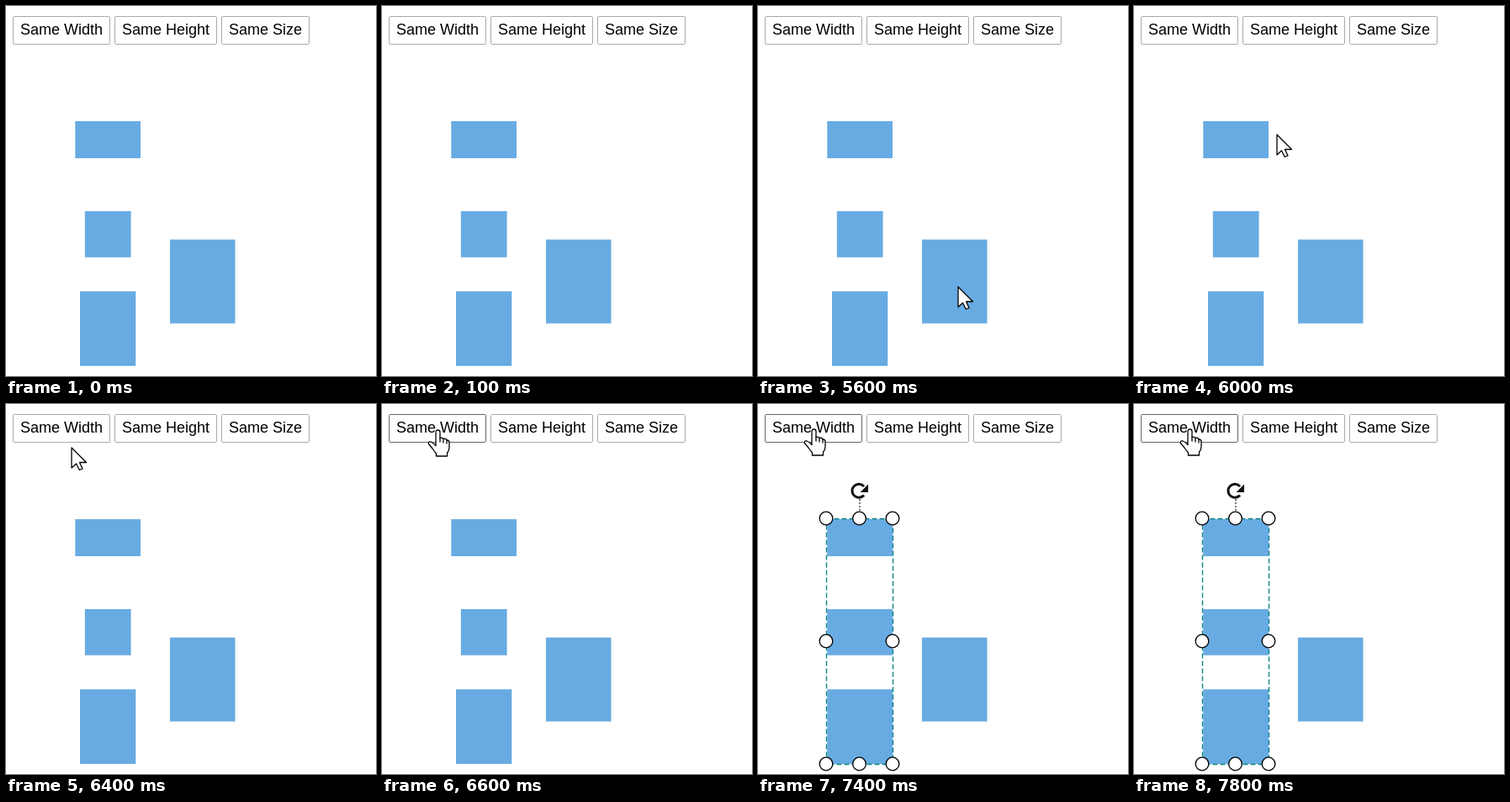
Recreate the animation shown at these times as an HTML page. Size 440 px wide and 440 px high, loop 8 s.

```html
<!DOCTYPE html>
<html lang="en">
<head>
<meta charset="utf-8">
<title>Same size commands</title>
<style>
  html, body { margin: 0; width: 100%; height: 100%; overflow: hidden; background: #fff; }
  svg { display: block; width: 100%; height: 100%; }
  text { font: 18px "Liberation Sans", Arial, sans-serif; }
  .button { fill: #fff; stroke: #aaa; }
  .button.hover { stroke: #666; }
  .shape { fill: #68abe2; }
  .handle, .pointer { fill: #fff; stroke: #000; stroke-width: 1.3; }
  .pointer { stroke-linejoin: round; stroke-linecap: round; }
</style>
</head>
<body>
<svg id="stage" viewBox="0 0 440 440">
  <g id="buttons"></g>
  <g id="shapes"></g>
  <g id="selection">
    <rect x="81.5" y="136.5" width="79" height="292" fill="none" stroke="#0b8585" stroke-width="1.4" stroke-dasharray="6 3"/>
    <path d="M121 113V128" stroke="#333" stroke-width="1.3" stroke-dasharray="2 2"/>
    <path d="M126 108.5A8 8 0 1 1 126 98" fill="none" stroke="#111" stroke-width="3"/>
    <path d="M131 95.5V105H121.5Z" fill="#111"/>
    <g id="handles"></g>
  </g>
  <path id="arrow" class="pointer" d="M0 0V24L5.5 19 9.3 26.5 13 25 9.5 17.5H17.5Z"/>
  <g id="hand" class="pointer">
    <path d="M-2 15V2.5Q-2 0 .5 0T3 2.5V9.5Q6 8.5 7 10.5 10 9.5 11 12 14 12 14 15V21Q14 24 11.5 27.5V31H-1.5V28Q-4 25 -6 22L-10.5 16.5Q-11.5 13.5 -8 14 -5 15 -2 18.5Z"/>
    <path d="M3 9.5V14M7 10.5V15M11 12V16" fill="none"/>
  </g>
</svg>
<script>
const LOOP = 8000, STEP = 100;
const HOVER_AT = 6500, RESIZE_AT = 7400;
const byId = id => document.getElementById(id);

function add(parent, tag, attributes, content = "") {
  const node = document.createElementNS("http://www.w3.org/2000/svg", tag);
  for (const name in attributes) node.setAttribute(name, attributes[name]);
  node.textContent = content;
  return byId(parent).appendChild(node);
}

const buttons = [["Same Width", 8, 116], ["Same Height", 129, 122], ["Same Size", 256, 105]]
  .map(([label, x, width]) => {
    const box = add("buttons", "rect", { class: "button", x: x + .5, y: 12.5, width: width - 1, height: 33, rx: 1 });
    add("buttons", "text", { x: x + 9, y: 34 }, label);
    return box;
  });

const shapes = [
  [82.3, 137, 77.7, 44], [93.8, 244, 54.8, 54.8], [88, 339.3, 66.3, 88.7], [195, 277.7, 77.5, 99.8]
].map(([x, y, width, height]) => ({ x, width, node: add("shapes", "rect", { class: "shape", x, y, width, height }) }));

for (const x of [81, 120.5, 160])
  for (const y of [136, 282, 428])
    if (x !== 120.5 || y !== 282) add("handles", "circle", { class: "handle", cx: x, cy: y, r: 7.8 });

// Pointer path: time, x, y
const path = [
  [5600, 238, 334], [6000, 170, 153], [6300, 107, 97], [6400, 78, 52],
  [6500, 70, 38], [6600, 66, 31], [6700, 66, 30], [LOOP, 66, 30]
];

function pointerAt(time) {
  const next = Math.max(1, path.findIndex(point => point[0] > time));
  const [t0, x0, y0] = path[next - 1], [t1, x1, y1] = path[next];
  const k = (time - t0) / (t1 - t0);
  return [x0 + (x1 - x0) * k, y0 + (y1 - y0) * k];
}

const show = (id, visible) => byId(id).setAttribute("display", visible ? "inline" : "none");

function draw(now) {
  const time = Math.floor(now % LOOP / STEP) * STEP;
  const hover = time >= HOVER_AT, resized = time >= RESIZE_AT;
  const move = `translate(${pointerAt(time)})`;
  byId("arrow").setAttribute("transform", move);
  byId("hand").setAttribute("transform", move);
  show("arrow", time >= path[0][0] && !hover);
  show("hand", hover);
  show("selection", resized);
  buttons[0].classList.toggle("hover", hover);
  for (const { x, width, node } of shapes.slice(1, 3)) {
    node.setAttribute("x", resized ? shapes[0].x : x);
    node.setAttribute("width", resized ? shapes[0].width : width);
  }
}

const start = performance.now();
function frame() {
  draw(performance.now() - start);
  requestAnimationFrame(frame);
}
frame();
</script>
</body>
</html>
```
